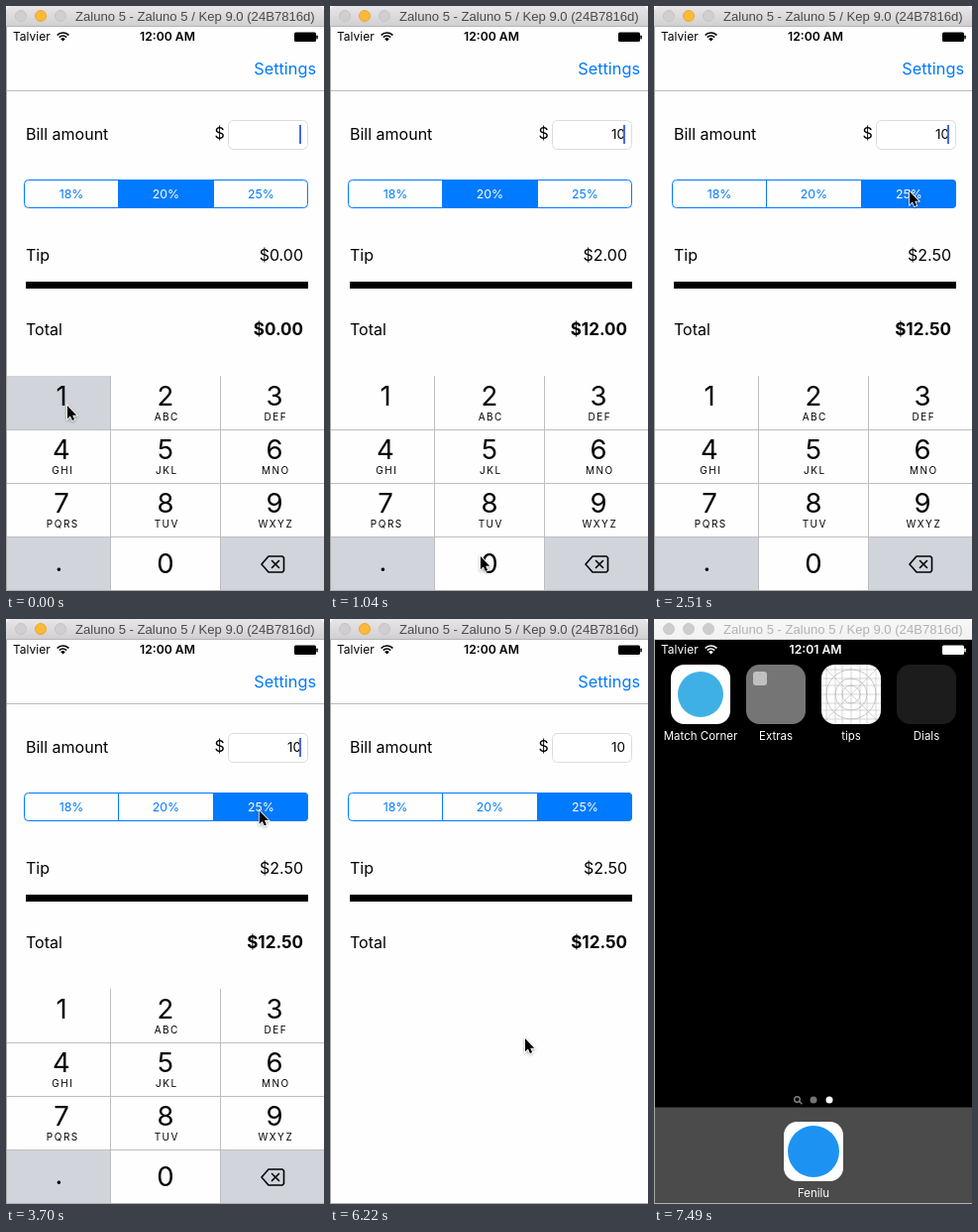
These frames come from a looping animation (321 px wide and 590 px high, 8000 ms). An HTML page with a canvas:

```html
<!DOCTYPE html>
<html lang="en">
<head>
<meta charset="utf-8">
<title>Tip calculator</title>
<style>
  html, body { margin: 0; width: 100%; height: 100%; overflow: hidden; background: #fff; }
  canvas { display: block; width: 321px; height: 590px; }
</style>
</head>
<body>
<canvas id="stage"></canvas>
<script>
const W = 321, H = 590, LOOP = 8000, TICK = 148;
const BLUE = '#007aff', PAPER = '#fefefe', KEY = '#d1d4db';
const SANS = 'Inter, Roboto, sans-serif';
const TITLE = 'Zaluno 5 - Zaluno 5 / Kep 9.0 (24B7816d)';

const canvas = document.getElementById('stage');
const c = canvas.getContext('2d');
const dpr = window.devicePixelRatio || 1;
canvas.width = W * dpr;
canvas.height = H * dpr;

// Pointer path: tick, x, y
const PATH = [
  [0, 61, 402], [1, 61, 402], [5, 151, 554], [8, 151, 554],
  [16, 257, 186], [23, 257, 186], [31, 243, 227], [41, 243, 227],
  [42, 196, 422], [43, 192, 450], [45, 195, 528], [47, 201, 600]
];

function rect(x, y, w, h, color) {
  c.fillStyle = color;
  c.fillRect(x, y, w, h);
}

function round(x, y, w, h, r, fill, stroke, line = 1) {
  c.beginPath();
  c.roundRect(x, y, w, h, r);
  if (fill) { c.fillStyle = fill; c.fill(); }
  if (stroke) { c.strokeStyle = stroke; c.lineWidth = line; c.stroke(); }
}

function disc(x, y, r, fill, stroke) {
  c.beginPath();
  c.arc(x, y, r, 0, Math.PI * 2);
  if (fill) { c.fillStyle = fill; c.fill(); }
  if (stroke) { c.strokeStyle = stroke; c.stroke(); }
}

function poly(points, close) {
  c.beginPath();
  points.forEach(([x, y], i) => i ? c.lineTo(x, y) : c.moveTo(x, y));
  if (close) c.closePath();
}

function text(str, x, y, size, color = '#000', align = 'left', weight = 400, gap = 0, family = SANS) {
  c.font = `${weight} ${size}px ${family}`;
  c.letterSpacing = gap + 'px';
  c.textAlign = align;
  c.fillStyle = color;
  c.fillText(str, x, y);
  c.letterSpacing = '0px';
}

function titleBar(active) {
  rect(0, 0, W, 21, '#fff');
  const g = c.createLinearGradient(0, 0, 0, 20);
  g.addColorStop(0, active ? '#e8e6e8' : '#f7f7f7');
  g.addColorStop(1, active ? '#d1cfd1' : '#f2f2f2');
  round(0, 0, W, 21, [5, 5, 0, 0], g);
  rect(0, 20, W, 1, active ? '#b6b4b6' : '#d4d4d4');
  c.lineWidth = 1;
  [15, 35, 55].forEach((x, i) => {
    const lit = active && i === 1;
    const fill = lit ? '#fdb937' : active ? '#d0ced0' : '#cdcdcd';
    const edge = lit ? '#e9a834' : active ? '#c6c4c6' : '#c9c9c9';
    disc(x, 10, 5.5, fill, edge);
  });
  text(TITLE, 70, 15, 13.1, active ? '#4a4a4a' : '#b2b2b2', 'left', 400, 0,
    '"Liberation Sans", Arial, sans-serif');
}

function statusBar(color, time) {
  text('Talvier', 7, 35, 12, color);
  c.strokeStyle = color;
  c.lineWidth = 1.7;
  for (const r of [8, 5]) {
    c.beginPath();
    c.arc(57.5, 35, r, -Math.PI * 0.76, -Math.PI * 0.24);
    c.stroke();
  }
  c.beginPath();
  c.moveTo(57.5, 35.5);
  c.arc(57.5, 35.5, 3.2, -Math.PI * 0.76, -Math.PI * 0.24);
  c.fillStyle = color;
  c.fill();
  text(time, 163, 35, 12.2, color, 'center', 600);
  round(291, 26.5, 22, 9.5, 1.5, color);
  round(313.3, 29.5, 1.5, 4, 0.7, color);
}

function edges() {
  rect(0, 21, 1, H - 21, '#a8a8a8');
  rect(0, 589, W, 1, '#b0b0b0');
}

function segments(chosen, pressed) {
  const xs = [18, 113, 209, 305];
  const fill = (i, color) => rect(xs[i], 175, xs[i + 1] - xs[i], 29, color);
  c.save();
  c.beginPath();
  c.roundRect(18, 175, 287, 29, 4);
  c.clip();
  rect(18, 175, 287, 29, PAPER);
  if (pressed >= 0) fill(pressed, '#d9ebff');
  fill(chosen, BLUE);
  c.restore();
  round(18.5, 175.5, 286, 28, 4, null, BLUE);
  for (const x of [113, 209]) rect(x, 175, 1, 29, BLUE);
  ['18%', '20%', '25%'].forEach((s, i) =>
    text(s, [66, 161.5, 257.5][i], 194, 12.3, i === chosen ? '#fff' : BLUE, 'center'));
}

function eraseIcon(x, y) {
  c.strokeStyle = '#000';
  c.lineWidth = 1.6;
  c.lineJoin = c.lineCap = 'round';
  poly([[x, y + 8], [x + 7, y], [x + 21, y], [x + 22.5, y + 1.5],
    [x + 22.5, y + 14.5], [x + 21, y + 16], [x + 7, y + 16]], true);
  c.stroke();
  poly([[x + 10.5, y + 4.5], [x + 17.5, y + 11.5]]);
  c.stroke();
  poly([[x + 17.5, y + 4.5], [x + 10.5, y + 11.5]]);
  c.stroke();
  c.lineJoin = 'miter';
  c.lineCap = 'butt';
}

function keyboard(top, down) {
  const xs = [1, 106, 217, 321], mid = [56, 161, 271];
  const hints = ['', 'ABC', 'DEF', 'GHI', 'JKL', 'MNO', 'PQRS', 'TUV', 'WXYZ'];
  const keys = ['1', '2', '3', '4', '5', '6', '7', '8', '9', '.', '0', 'del'];
  c.save();
  c.beginPath();
  c.rect(1, 21, 320, 568);
  c.clip();
  keys.forEach((k, i) => {
    const col = i % 3, y = top + 54 * Math.floor(i / 3);
    const special = k === '.' || k === 'del';
    rect(xs[col], y, xs[col + 1] - xs[col], 54, special || k === down ? KEY : PAPER);
    if (k === 'del') eraseIcon(258, y + 20);
    else if (k === '.') text(k, 53.5, y + 35, 27, '#000', 'center');
    else text(k, mid[col], y + (k === '0' ? 37 : 30), 27.5, '#000', 'center');
    if (hints[i]) text(hints[i], mid[col] + 1.3, y + 45, 10, '#000', 'center', 400, 1.5);
  });
  for (let r = 1; r < 4; r++) rect(1, top + 54 * r, 320, 1, '#bcbec2');
  for (const x of [105, 216]) rect(x, top, 1, 216, '#bcbec2');
  c.restore();
}

function pointer(n) {
  if (n >= 47) return;
  let i = 0;
  while (PATH[i + 1][0] <= n) i++;
  const [n0, x0, y0] = PATH[i], [n1, x1, y1] = PATH[i + 1];
  const p = (n - n0) / (n1 - n0), e = p * p * (3 - 2 * p);
  c.save();
  c.translate(x0 + (x1 - x0) * e + 0.5, y0 + (y1 - y0) * e + 1);
  c.scale(0.86, 0.86);
  poly([[0.5, 0], [0.5, 15.5], [4, 12.2], [6.3, 17.4], [8.8, 16.4], [6.6, 11.3], [11.3, 11.3]], true);
  c.shadowColor = 'rgba(0,0,0,.35)';
  c.shadowBlur = 3 * dpr;
  c.shadowOffsetY = dpr;
  c.strokeStyle = '#fff';
  c.lineWidth = 2;
  c.stroke();
  c.shadowColor = 'transparent';
  c.fillStyle = '#000';
  c.fill();
  c.restore();
}

function calculator(n, active) {
  const bill = n < 1 ? 0 : n < 7 ? 1 : 10;
  const chosen = n < 17 ? 1 : 2;
  const tip = bill * [0.18, 0.2, 0.25][chosen];
  const money = v => '$' + v.toFixed(2);

  rect(0, 0, W, H, PAPER);
  titleBar(active);
  statusBar('#000', '12:00 AM');
  text('Settings', 313, 69, 16.3, BLUE, 'right');
  rect(0, 85, W, 1, '#bcbcbc');

  text('Bill amount', 20, 135, 16);
  text('$', 210.5, 134, 16);
  round(224.5, 115.5, 80, 29, 5, '#fff', '#dcdcdc');
  if (bill) text(bill, 298, 134, 13.5, '#000', 'right');
  const caret = n < 32 && (n % 6 < 3 || n === 17);
  if (caret) rect(296, 120, 2, 19, '#4a68e8');

  segments(chosen, n === 16 ? 2 : -1);
  text('Tip', 20, 257, 16);
  text(money(tip), 300, 256.5, 16, '#000', 'right');
  rect(20, 278, 285, 7, '#000');
  text('Total', 20, 332, 16);
  text(money(bill + tip), 300, 332, 17, '#000', 'right', 700);

  const p = Math.min(1, Math.max(0, (n - 32) / 4));
  if (p < 1) {
    const down = n === 0 ? '1' : n === 6 ? '0' : '';
    keyboard(373 + Math.round(217 * (1 - (1 - p) ** 3)), down);
  }
  edges();
  pointer(n);
}

function tile(x, y, fill) {
  round(x, y, 60, 60, 13.5, fill);
}

function gridIcon(x, y) {
  tile(x, y, '#fff');
  c.save();
  c.clip();
  c.translate(x, y);
  c.strokeStyle = '#bcbcbc';
  c.lineWidth = 0.6;
  for (const d of [5, 14, 21, 30, 39, 46, 55]) {
    poly([[d, 0], [d, 60]]);
    c.stroke();
    poly([[0, d], [60, d]]);
    c.stroke();
  }
  poly([[0, 0], [60, 60]]);
  c.stroke();
  poly([[60, 0], [0, 60]]);
  c.stroke();
  for (const r of [9, 16, 25]) disc(30, 30, r, null, '#a6a6a6');
  c.restore();
}

function homeScreen() {
  rect(0, 0, W, H, '#000');
  titleBar(false);
  statusBar('#fff', '12:01 AM');

  tile(17, 46, '#fff');
  disc(47, 76, 23, '#3fb0e6');
  tile(93, 46, '#757575');
  round(100, 53, 14, 14, 3, '#c0c0c0');
  gridIcon(169, 46);
  tile(245, 46, '#1c1c1c');
  ['Match Corner', 'Extras', 'tips', 'Dials'].forEach((s, i) =>
    text(s, 47 + 76 * i, 122, 11.5, '#fff', 'center'));

  c.lineWidth = 1.4;
  disc(144.5, 484.5, 2.8, null, '#808080');
  poly([[146.6, 486.6], [149.5, 489.3]]);
  c.stroke();
  disc(161, 485, 3.5, '#747474');
  disc(177, 485, 3.5, '#fff');

  rect(0, 492.5, W, 97, '#4b4b4b');
  tile(131, 507, '#fff');
  disc(161, 537, 26, '#1c93f3');
  text('Fenilu', 161, 583, 11.5, '#fff', 'center');
  edges();
}

function draw(t) {
  c.setTransform(dpr, 0, 0, dpr, 0, 0);
  if (t >= 7490) homeScreen();
  else calculator(Math.floor((t + 8) / TICK), t < 7340);
}

const start = performance.now();
function frame() {
  draw((performance.now() - start) % LOOP);
  requestAnimationFrame(frame);
}
frame();
</script>
</body>
</html>
```
